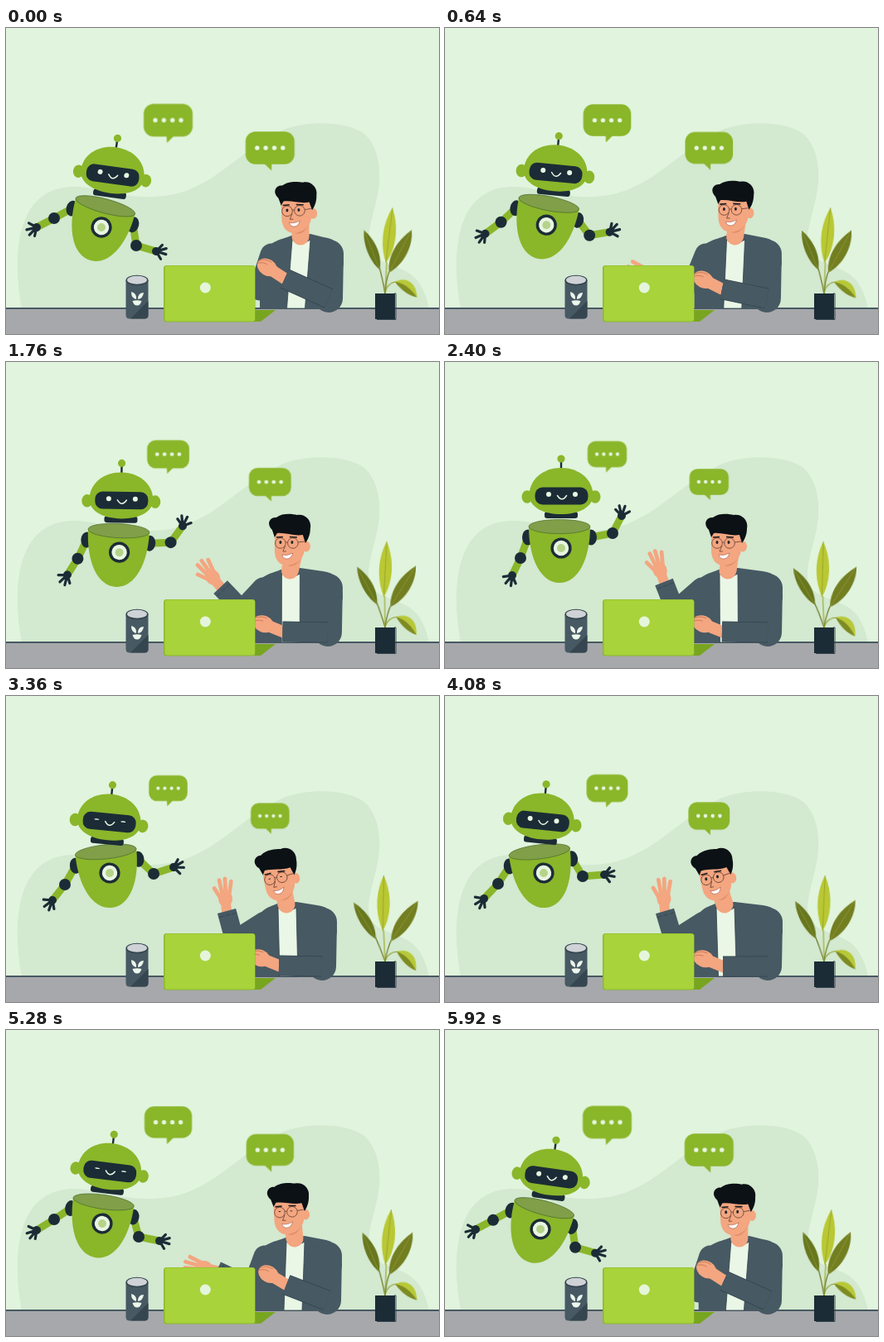
Write an HTML page that moves like this. It is 522 by 370 pixels and loops after 6 s.

```html
<!DOCTYPE html>
<html lang="en">
<head>
<meta charset="utf-8">
<title>Robot chat</title>
<style>
  html, body { margin: 0; width: 100%; height: 100%; overflow: hidden; background: #e1f4dd; }
  svg { display: block; width: 522px; height: 370px; }
  .green { fill: #8ab62a; }
  .dark { fill: #1c2c36; }
  .pale { fill: #e8f6e2; }
  .skin { fill: #f3a680; }
  .coat { fill: #475963; }
  .limb { fill: none; stroke-linejoin: round; }
  .swing { animation: 3s cubic-bezier(.364, 0, .636, 1) infinite alternate; }
  .bubble { animation-name: shrink; }
  .leaf { animation-name: sway; transform-origin: 457px 321px; }
  @keyframes shrink { to { transform: scale(.78); } }
  @keyframes sway {
    from { transform: rotate(var(--a)); }
    to { transform: rotate(calc(var(--a) * -1)); }
  }
</style>
</head>
<body>
<svg viewBox="0 0 522 370">
  <defs>
    <g id="dots" class="pale">
      <circle cx="-15.5" r="2.7"/><circle cx="-5.2" r="2.7"/><circle cx="5.2" r="2.7"/><circle cx="15.5" r="2.7"/>
    </g>
    <g id="claw" stroke="#1c2c36" stroke-width="3.2" stroke-linecap="round">
      <circle r="5" class="dark" stroke="none"/>
      <path d="M0 0L7 -8M0 0L12 -4M0 0L12 3M0 0L6 9"/>
    </g>
  </defs>

  <rect width="522" height="370" fill="#e1f4dd"/>
  <path fill="#d3e9d0" d="M19 340C10 290 12 246 30 218C48 192 76 189 104 194C150 206 190 209 224 194C268 174 292 142 334 123C366 111 412 113 432 128C450 144 454 176 447 206C440 238 430 262 444 276C460 290 484 288 498 308Q507 322 510 340Z"/>

  <g transform="translate(195.5 111.5)"><g class="swing bubble">
    <path class="green" d="M-2 18H8L-1.5 27.5Z"/>
    <rect class="green" x="-29.5" y="-19.7" width="59" height="39.4" rx="12"/>
    <use href="#dots"/>
  </g></g>
  <g transform="translate(318.3 145)"><g class="swing bubble">
    <path class="green" d="M2 18H-8L1.8 27.5Z"/>
    <rect class="green" x="-29.5" y="-19.7" width="59" height="39.4" rx="12"/>
    <use href="#dots"/>
  </g></g>

  <g id="robot">
    <g id="armL"></g>
    <g id="armR"></g>
    <g id="body">
      <ellipse class="dark" cx="-40" cy="-13" rx="7" ry="9.5"/>
      <ellipse class="dark" cx="36" cy="-13" rx="7" ry="9.5"/>
      <path class="green" d="M-39 -26C-39 14 -24 42 -2 42S35 14 35 -26Z"/>
      <ellipse cx="-2" cy="-26" rx="37" ry="8.6" fill="#809f48" stroke="#4d6b2a" stroke-width=".7"/>
      <circle class="dark" r="12.6"/>
      <circle class="pale" r="9.2"/>
      <circle r="5" fill="#b6d38a"/>
    </g>
    <g id="head">
      <rect class="dark" x="-20" y="25" width="40" height="8" rx="3"/>
      <path d="M0 -27V-37" stroke="#1c2c36" stroke-width="2.4"/>
      <circle class="green" cy="-39" r="4.6"/>
      <ellipse class="green" cx="-41" cy="7" rx="6.5" ry="7.8"/>
      <ellipse class="green" cx="41" cy="7" rx="6.5" ry="7.8"/>
      <path class="green" d="M-38.5 5C-38 -15 -21 -28 0 -28S38 -15 38.5 5C38 20 21 28 0 28S-38 20 -38.5 5Z"/>
      <rect class="dark" x="-31.5" y="-4.5" width="64" height="21" rx="9"/>
      <ellipse class="pale blink" cx="-15" cy="4" rx="3" ry="3"/>
      <ellipse class="pale blink" cx="17" cy="4" rx="3" ry="3"/>
      <path d="M-4.5 5.5Q1 14 6.5 5.5" fill="none" stroke="#e8f6e2" stroke-width="1.5" stroke-linecap="round"/>
    </g>
  </g>

  <rect y="339" width="522" height="31" fill="#a7a8ab"/>
  <rect y="338" width="522" height="2" fill="#475963"/>

  <g fill="none" stroke-width="1.2">
    <g class="swing leaf" style="--a:5deg">
      <path d="M457 321Q452 302 447 289" stroke="#67751f"/>
      <path d="M448 293C434 283 425 263 425 247C439 257 450 275 448 293Z" fill="#68771d"/>
      <path d="M448 293L425 247" stroke="#8f9b3d" stroke-width=".7"/>
    </g>
    <g class="swing leaf" style="--a:3deg">
      <path d="M457 321V283" stroke="#9bab2c"/>
      <path d="M456 284C447 261 450 236 460.500 217C470 241 467 267 456 284Z" fill="#b9c833"/>
      <path d="M456 284L460.500 217" stroke="#8b9a26" stroke-width=".7"/>
    </g>
    <g class="swing leaf" style="--a:-3deg">
      <path d="M457 321Q459 304 464 293" stroke="#67751f"/>
      <path d="M463 296C462 275 476 257 493 246C494 265 482 287 463 296Z" fill="#737e20"/>
      <path d="M463 296L493 246" stroke="#939e42" stroke-width=".7"/>
    </g>
    <g class="swing leaf" style="--a:-5deg">
      <path d="M457 321Q460 308 473 308" stroke="#8d9d2c"/>
      <path d="M470 308C484 302 496 311 495 329C487 325 482 313 470 308Z" fill="#b7c838"/>
      <path d="M470 308C482 311 488 318 495 329C485 326 477 319 470 308Z" fill="#7d8b22"/>
    </g>
  </g>
  <rect class="dark" x="445" y="321" width="24" height="31"/>
  <path d="M468 321H470V352.500H447" fill="none" stroke="#33434c" stroke-width="1"/>

  <g id="man">
    <path id="upperL" class="limb" stroke="#475963" stroke-width="27" stroke-linecap="round"/>
    <path id="torso" class="coat"/>
    <path id="shirt" fill="#eaf7e6" stroke="#33444e" stroke-width=".8"/>
    <path id="neck" class="limb" stroke="#f3a680" stroke-width="21" stroke-linecap="round"/>
    <g id="face">
      <path d="M-8 22Q4 34 15 16" fill="#dd8963"/>
      <ellipse class="skin" cx="20" cy="3" rx="5" ry="6.5"/>
      <path class="skin" d="M-18 -18V8C-18 19 -12 26 -3 26C8 26 18 17 18 6V-18Z"/>
      <path fill="#0b1115" d="M-18 -8L-21 -17C-29 -25 -23 -33 -16 -32C-8 -38 4 -36 9 -35C19 -37 27 -28 25 -19C25 -11 22 -5 19 -1L16 -11C6 -9 -5 -14 -15 -13Z"/>
      <g fill="none" stroke="#744a3b" stroke-width=".9">
        <circle cx="-11" cy="-1" r="6.3"/><circle cx="4" cy="-1" r="6.3"/>
        <path d="M-4.700 -2H-2.300M10.300 -2L18 -3"/>
        <path d="M-5 2L-8 9H-4"/>
      </g>
      <path d="M-16 -8L-8 -8.500M0 -8.500L9 -8" stroke="#1a1b1d" stroke-width="1.600"/>
      <ellipse class="blink" cx="-11" cy="-2" rx="1.500" ry="2" fill="#20262a"/>
      <ellipse class="blink" cx="3" cy="-2" rx="1.500" ry="2" fill="#20262a"/>
      <path d="M-9 13Q-3 15 4 11Q2 18 -3 18Q-8 18 -9 13Z" fill="#fff" stroke="#a65a45" stroke-width=".6"/>
    </g>
    <g id="palmL" stroke="#f3a680" stroke-linecap="round">
      <path d="M-4 0H12" stroke-width="12"/>
      <ellipse class="skin" cx="15" rx="10" ry="8.500" stroke="none"/>
      <path d="M17 -6L29 -12M20 -3L38 -5M20 1L39 2M19 5L35 9" stroke-width="4.800"/>
    </g>
    <path id="foreL" class="limb" stroke="#475963" stroke-width="23"/>
    <path id="cuffL" class="limb" stroke="#33444e" stroke-width=".8" stroke-dasharray="6 2"/>
    <path id="upperR" class="limb" stroke="#475963" stroke-width="34" stroke-linecap="round"/>
    <g id="palmR" stroke="#f3a680" stroke-linecap="round">
      <path d="M-6 0H18" stroke-width="14"/>
      <ellipse class="skin" cx="25" rx="13" ry="10" stroke="none"/>
      <path d="M24 8Q34 8 38 1M27 3Q34 3 38 -3" fill="none" stroke="#c87752" stroke-width=".8"/>
    </g>
    <path id="edgeR" class="limb" stroke="#33444e" stroke-width="25"/>
    <path id="foreR" class="limb" stroke="#475963" stroke-width="23.600"/>
  </g>

  <path fill="#78a51f" d="M299 341H325L307 355H299Z"/>
  <rect x="190" y="287" width="110.500" height="68.500" rx="3.500" fill="#8cb82b"/>
  <rect x="191.500" y="287.500" width="108.500" height="67" rx="3" fill="#a8d33b"/>
  <circle cx="240.300" cy="314" r="6.500" fill="#e4f5dc"/>

  <path d="M144.500 305V347Q144.500 351.500 149 351.500H167Q171.500 351.500 171.500 347V305Z" fill="#475963"/>
  <path d="M171.500 330V347Q171.500 351.500 167 351.500H150Z" fill="#364650"/>
  <ellipse cx="158" cy="305" rx="13.500" ry="6.300" fill="#32434d"/>
  <ellipse cx="158" cy="304.700" rx="12" ry="5" fill="#cfd2d6"/>
  <g fill="#edf6ec">
    <path d="M157 328Q151 327 151 319Q158 321 157 328Z"/>
    <path d="M159 328Q159 320 166 320Q165 327 159 328Z"/>
    <path d="M152.500 330Q158 328.500 163.500 330Q162 335.500 158 335.500T152.500 330Z"/>
  </g>
</svg>

<script>
const LOOP = 6000, STEP = 80;
const times = [0, 1200, 2400, 3360, 4080, 5280];
const $ = id => document.getElementById(id);

// Periodic monotone cubic curve through one value per key time
function curve(v) {
  const n = v.length, prev = i => (i + n - 1) % n;
  const gap = times.map((t, i) => (i + 1 < n ? times[i + 1] : LOOP) - t);
  const slope = v.map((x, i) => (v[(i + 1) % n] - x) / gap[i]);
  const tan = v.map((_, i) => {
    const a = slope[prev(i)], b = slope[i];
    return a * b <= 0 ? 0 : 2 * a * b / (a + b);
  });
  return t => {
    let i = n - 1;
    while (times[i] > t) i--;
    const j = (i + 1) % n, u = (t - times[i]) / gap[i], w = 1 - u;
    return v[i] * (1 + 2 * u) * w * w + v[j] * u * u * (3 - 2 * u)
      + gap[i] * u * w * (tan[i] * w - tan[j] * u);
  };
}

// Rows are poses, columns are separate curves
function track(rows) {
  const parts = rows[0].map((_, c) => curve(rows.map(r => r[c])));
  return t => parts.map(f => f(t));
}

// Robot: x, y, angle
const head = track([[129, 172, 8], [137, 165.5, 2.5], [140, 156, 0], [124.7, 146.5, 5.5], [118, 145.5, 6], [125.5, 165, 7]]);
const body = track([[115, 241, 15], [131, 234, 6], [140, 225, 0], [125, 214, -6], [119, 214, -7], [116, 234, 8]]);
// Elbow and wrist points
const armL = track([[58, 230, 37, 241], [79, 238, 63, 256], [91, 237, 81, 258], [71, 228, 56, 247], [64, 227, 47, 245], [58, 229, 37, 242]]);
const armR = track([[157, 263, 181, 270], [192, 234, 213, 218], [202, 207, 213, 186], [178, 215, 202, 207], [166, 218, 192, 216], [160, 250, 185, 255]]);
const clawR = curve([3, -62, -85, -12, -3, 3]);

// Man
const face = track([[350, 222, -2], [344, 220, 0], [339, 220, 0], [329, 221, -11], [326, 221, -12], [341, 221, -3]]);
// Neck, left side, right side
const trunk = track([[355, 306, 407], [344, 296, 405], [341, 296, 407], [338, 298, 399], [337, 298, 407], [348, 298, 405]]);
// Elbow, wrist, hand angle
const manL = track([[302, 316, 262, 318, -178], [290, 299, 255, 280, -148], [274, 302, 264, 266, -109], [272, 297, 266, 260, -96], [272, 297, 265, 260, -94], [294, 312, 254, 291, -167]]);
// Wrist, hand angle
const manR = track([[336, 303, -147], [333, 326, -158], [334, 326, -158], [329, 326, -158], [335, 327, -158], [338, 308, -149]]);

const line = (...p) => 'M' + p.join(' ');
const draw = (id, d) => $(id).setAttribute('d', d);
const place = (el, x, y, a) => el.setAttribute('transform', `translate(${x} ${y}) rotate(${a})`);

for (const id of ['armL', 'armR']) {
  $(id).innerHTML = `<path class="limb" stroke="#8ab62a" stroke-width="9"/>
    <circle class="dark" r="7"/><use href="#claw"/>`;
}

function robotArm(id, [bx, by, ba], side, [ex, ey, wx, wy], angle) {
  const a = ba * Math.PI / 180, lx = side * 38 - 2, ly = -13;
  const sx = bx + lx * Math.cos(a) - ly * Math.sin(a);
  const sy = by + lx * Math.sin(a) + ly * Math.cos(a);
  const [limb, joint, claw] = $(id).children;
  limb.setAttribute('d', line(sx, sy, ex, ey, wx, wy));
  place(joint, ex, ey, 0);
  place(claw, wx, wy, angle ?? Math.atan2(wy - ey, wx - ex) * 180 / Math.PI);
}

function drawMan(t) {
  const [fx, fy, fa] = face(t), [nx, lx, rx] = trunk(t);
  const [ex, ey, wx, wy, la] = manL(t), [hx, hy, ra] = manR(t);
  const base = 344 + (nx - 344) * .5, elbow = [rx - 18, 327];
  place($('face'), fx, fy, fa);
  draw('neck', line(fx + 5, fy + 12, nx, 252));
  draw('torso', `M${nx - 11} 251C${nx - 24} 257 ${lx + 8} 256 ${lx} 282V340H${rx - 12}L${rx} 285`
    + `C${rx} 262 ${rx - 10} 255 ${rx - 24} 253L${nx + 12} 249Z`);
  draw('shirt', `M${nx - 10} 256Q${nx} 264 ${nx + 12} 256L${base + 11} 339H${base - 11}Z`);
  draw('upperL', line(lx + 14, 274, ex + 4, ey));
  draw('foreL', line(ex + 4, ey, wx, wy));
  const dx = wx - ex - 4, dy = wy - ey, len = Math.hypot(dx, dy), ux = dx / len, uy = dy / len;
  const cx = wx - ux * 5, cy = wy - uy * 5;
  draw('cuffL', line(cx - uy * 11, cy + ux * 11, cx + uy * 11, cy - ux * 11));
  place($('palmL'), wx, wy, la);
  draw('upperR', line(rx - 17, 273, ...elbow));
  draw('edgeR', line(...elbow, hx, hy));
  draw('foreR', line(...elbow, hx, hy));
  place($('palmR'), hx, hy, ra);
}

function drawRobot(t) {
  const b = body(t);
  place($('head'), ...head(t));
  place($('body'), ...b);
  robotArm('armL', b, -1, armL(t));
  robotArm('armR', b, 1, armR(t), clawR(t));
}

const eyes = [...document.querySelectorAll('.blink')].map(el => [el, +el.getAttribute('ry')]);
function blink(t) {
  const off = Math.min(Math.abs(t - 3360), Math.abs(t - 5280));
  const open = Math.max(.25, Math.min(1, off / 200));
  for (const [el, ry] of eyes) el.setAttribute('ry', ry * open);
}

function frame() {
  const t = Math.floor(performance.now() % LOOP / STEP) * STEP;
  drawRobot(t);
  drawMan(t);
  blink(t);
  requestAnimationFrame(frame);
}
frame();
</script>
</body>
</html>
```
